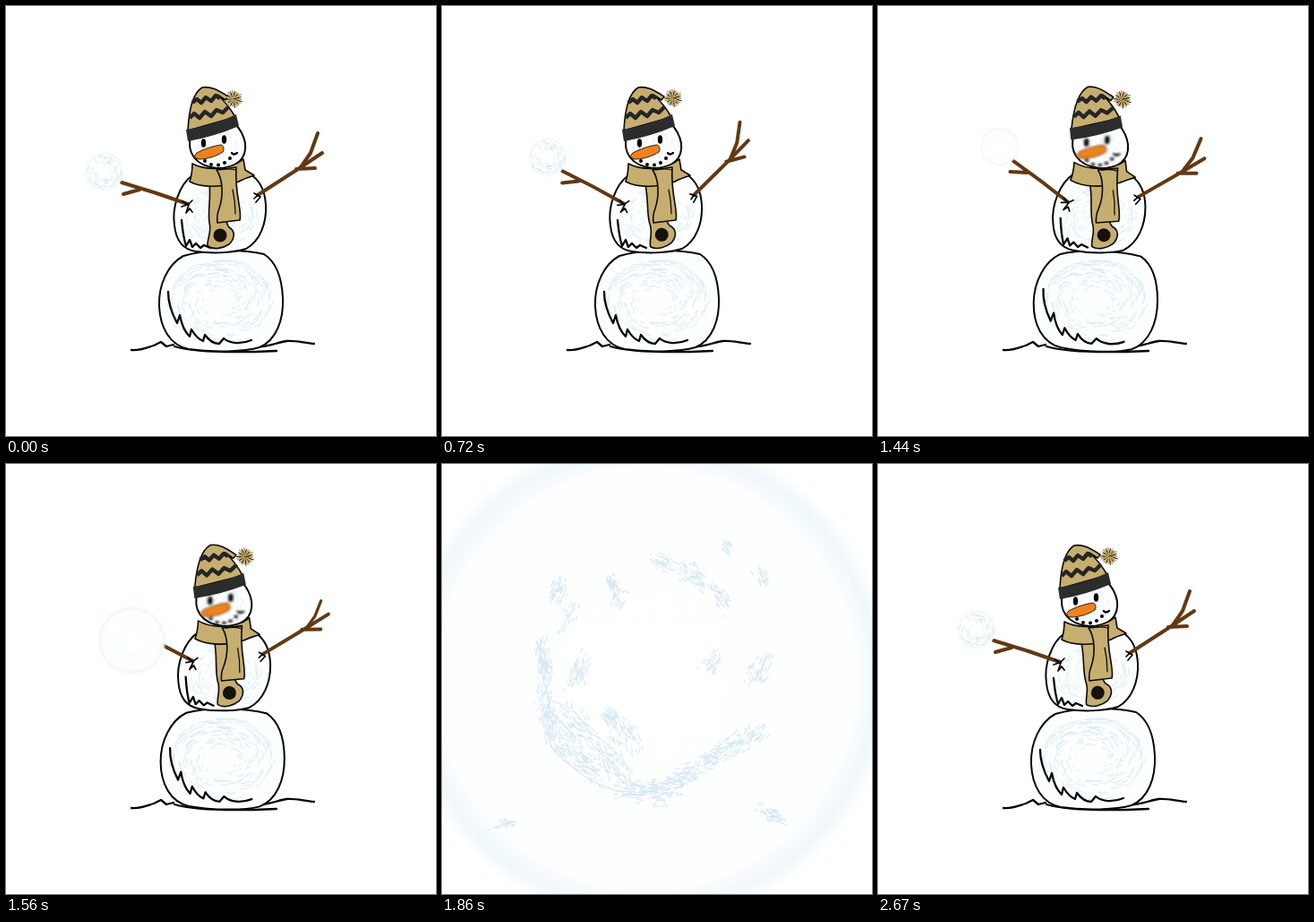
These frames come from a looping animation (480x480 px, 2.85 s). An HTML page:

```html
<!DOCTYPE html>
<html lang="en">
<head>
<meta charset="utf-8">
<title>Snowman throws a snowball</title>
<style>
  html, body { margin: 0; width: 100%; height: 100%; overflow: hidden; background: #fff; }
  svg { display: block; width: 100vw; height: 100vh; }
  .ink { fill: none; stroke: #050505; stroke-width: 2.3; stroke-linecap: round; stroke-linejoin: round; }
  .snow { fill: #fdfeff; stroke: #050505; stroke-width: 2; stroke-linejoin: round; }
  .wool { fill: #c6ae70; stroke: #0b0906; stroke-width: 1.6; stroke-linejoin: round; }
  .wood { fill: none; stroke: #633812; stroke-width: 4; stroke-linecap: round; stroke-linejoin: round; }
  .tex { fill: none; stroke: #d5e9f4; stroke-linecap: round; }
  .stripe { fill: none; stroke: #252525; stroke-width: 4.4; stroke-linejoin: round; }
</style>
</head>
<body>
<svg viewBox="0 0 480 480">
  <defs>
    <radialGradient id="puff">
      <stop offset="0" stop-color="#fff"/>
      <stop offset=".84" stop-color="#fdfeff"/>
      <stop offset=".93" stop-color="#eff7fa" stop-opacity=".9"/>
      <stop offset="1" stop-color="#eff7fa" stop-opacity="0"/>
    </radialGradient>
    <filter id="smear" x="-20%" y="-20%" width="140%" height="140%"><feGaussianBlur stdDeviation="1.5 .8"/></filter>
  </defs>

  <path class="ink" d="M140 384C150 385 158 381 165 379L173 375L179 380L187 378M188 380C212 387 260 387 302 385M279 381C294 380 302 376 313 374C323 373 332 376 344 377"/>

  <g id="man">
    <path class="snow" d="M198 279C181 288 170 311 171 335C172 359 183 379 204 383C231 387 266 386 283 381C302 373 310 350 309 326C308 303 302 286 288 277C262 271 222 272 198 279Z"/>
    <path class="tex" id="low"/>
    <path class="ink" d="M181 319C181 331 185 343 191 354L194 345C196 356 200 364 205 369L207 361C211 368 215 372 220 374L222 367C227 374 232 377 238 377L243 371C250 377 262 378 274 373"/>

    <path class="snow" d="M208 189C193 200 185 225 188 245C190 263 198 272 212 274C233 277 255 275 268 271C284 262 291 242 290 222C289 206 284 195 273 188Z"/>
    <path class="tex" id="mid"/>
    <path class="ink" d="M196 239C197 250 198 258 201 268L205 261L208 269L212 265L217 270L221 267L228 270"/>

    <path class="snow" d="M206 146C202 162 210 179 236 181C258 181 269 170 267 153C265 143 259 135 256 132Z"/>
    <path class="tex" id="top"/>
    <g id="face">
      <ellipse cx="220.500" cy="153" rx="2.700" ry="4.800"/>
      <ellipse cx="243.500" cy="149" rx="2.700" ry="4.800"/>
      <path d="M240 155C232 156 220 160 213 164C209 167 211 171 216 171C225 171 236 167 242 163C244 160 243 156 240 155Z" fill="#f0821e" stroke="#321804"/>
      <path class="ink" d="M252 164Q254 167 258 164"/>
      <g id="coal"></g>
    </g>

    <g id="tail">
      <path class="wool" d="M227 198C229 215 225 228 227 242C230 252 224 261 225 268C232 273 243 270 249 266C256 259 256 251 249 247C243 240 246 220 245 200Z"/>
      <circle cx="239" cy="256" r="7.500" fill="#15120d"/>
    </g>
    <path class="wool" d="M208 176C224 184 249 184 265 171L267 183L277 189C270 192 265 193 260 196C243 202 220 204 205 196Q208 187 208 176Z"/>
    <path class="wool" d="M235 183C242 193 243 211 238 226Q235 233 236 242L261 239C264 228 255 211 257 180Z"/>
    <path class="ink" d="M256 183Q249 181 239 183M253 205Q256 218 256 232" style="stroke-width:1.200"/>

    <path class="wool" d="M203 139C204 119 207 98 219 91C229 89 238 95 248 101L245 105L236 99C245 107 252 117 256 124Z"/>
    <path class="stripe" d="M208 108L213 104L218 108L223 102L229 106L234 100L239 103"/>
    <path class="stripe" d="M205 125L210 120L216 125L222 118L229 123L235 116L242 119L249 112"/>
    <path d="M201 138Q230 134 257 121L260 134Q232 146 203 151Z" fill="#2c2c2c"/>
    <g id="pom"></g>

    <g id="armL">
      <path class="wood" d="M203 221Q167 208 129 197M149 205L131 210"/>
      <path class="ink" d="M197 218L203 222L208 217M202 222L196 224M204 222L201 231L205 226L208 230" style="stroke-width:1.700"/>
    </g>
    <g id="armR">
      <path class="wood" d="M281 211L326 182L353 164M324 182L345 181"/>
      <path class="wood" id="twig" d="M329 180L340 164L348 142"/>
      <path class="ink" d="M277 209L284 213L279 219M281 211L277 215" style="stroke-width:1.700"/>
    </g>
  </g>

  <g id="hand"><circle r="22" fill="url(#puff)"/><path class="tex" id="handTex"/></g>
  <g id="shot">
    <circle id="disc" fill="url(#puff)"/>
    <path class="tex" id="splat" stroke-width="1.300"/>
  </g>
</svg>

<script>
const LOOP = 2850, STEP = 30;
const $ = id => document.getElementById(id);
const set = (id, k, v) => $(id).setAttribute(k, v);
const clamp = v => Math.max(0, Math.min(1, v));
const ease = v => v * v * (3 - 2 * v);
const f = v => v.toFixed(1);

let seed = 7;
const rnd = () => (seed = seed * 16807 % 2147483647) / 2147483647;
const spread = () => rnd() + rnd() - 1;

// Short brush arcs circling inside an ellipse
function scribble(id, cx, cy, rx, ry, n, w) {
  let d = '';
  for (let i = 0; i < n; i++) {
    const a = rnd() * 6.28, q = Math.sqrt(.08 + rnd() * .85), s = .1 + rnd() * .25;
    const at = (b, k) => f(cx + rx * k * Math.cos(b)) + ' ' + f(cy + ry * k * Math.sin(b));
    d += `M${at(a, q)}Q${at(a + s / 2, q * 1.04)} ${at(a + s, q * (.92 + rnd() * .1))}`;
  }
  set(id, 'd', d);
  set(id, 'stroke-width', w);
}

// Flecks scattered along a slanted streak
function streak(x, y, len, wide, deg, n) {
  const a = deg * Math.PI / 180, c = Math.cos(a), s = Math.sin(a);
  let d = '';
  for (let i = 0; i < n; i++) {
    const u = spread() * len / 2, v = spread() * wide / 2, l = 2 + rnd() * 6, b = a + spread() * .5;
    d += `M${f(x + u * c - v * s)} ${f(y + u * s + v * c)}l${f(l * Math.cos(b))} ${f(l * Math.sin(b))}`;
  }
  return d;
}

scribble('low', 240, 329, 62, 48, 190, .8);
scribble('mid', 239, 235, 45, 34, 100, .8);
scribble('top', 238, 159, 26, 19, 35, .7);
scribble('handTex', 0, 0, 20, 20, 75, .9);

const patches = [
  [125, 113, 42, 30, 112, 55], [137, 152, 62, 24, 110, 26], [196, 104, 24, 18, 70, 40],
  [207, 126, 34, 32, 115, 28], [265, 77, 40, 24, 25, 45], [308, 96, 62, 34, 40, 65],
  [346, 123, 60, 24, 55, 45], [354, 54, 28, 20, 65, 22], [407, 98, 34, 24, 65, 26],
  [152, 226, 66, 30, 112, 60], [337, 217, 38, 26, 128, 34], [402, 228, 56, 34, 118, 60],
  [195, 292, 36, 24, 50, 65], [216, 320, 62, 46, 60, 60], [45, 442, 46, 18, -8, 30],
  [416, 428, 56, 22, 22, 50], [103, 220, 90, 26, 85, 120], [106, 285, 100, 30, 80, 120],
  [137, 302, 76, 60, 50, 100], [150, 350, 110, 36, 42, 130], [190, 350, 120, 30, 50, 90]
];
let marks = patches.map(p => streak(...p)).join('');
// Lower crescent, thinning towards the right
for (let i = 0; i < 11; i++) {
  const k = i / 10;
  marks += streak(218 + 176 * k, 396 - 8 * Math.sin(k * 3) - 74 * k * k + 8 * Math.sin(k * 6), 46, 34, 8 - 50 * k, 52 - 22 * k);
}
marks += 'M98 184Q96 238 111 272Q101 300 112 334M108 270Q150 278 165 315Q196 328 226 372M112 334Q158 386 214 398M262 406l-8 11h20l-8 -11zM274 379l22 6l-8 -9z';
set('splat', 'd', marks);

$('coal').innerHTML = [[222, 173], [229, 177], [237, 177.500], [244, 175], [250, 170]]
  .map(([x, y]) => `<circle cx="${x}" cy="${y}" r="2"/>`).join('');

let fluff = '<circle cx="254" cy="104" r="7" fill="#c6ae70"/>';
for (let i = 0; i < 22; i++) {
  const a = i / 22 * 6.283, r = 8 + rnd() * 2.5;
  fluff += `<path d="M254 104l${f(r * Math.cos(a))} ${f(r * Math.sin(a))}" stroke="${i % 2 ? '#15110a' : '#c6ae70'}" stroke-width="${i % 2 ? 1 : 2}"/>`;
}
$('pom').innerHTML = fluff;

function track(t, keys) {
  if (t <= keys[0][0]) return keys[0][1];
  for (let i = 1; i < keys.length; i++) {
    const [t1, v1] = keys[i], [t0, v0] = keys[i - 1];
    if (t <= t1) return v0 + (v1 - v0) * ease((t - t0) / (t1 - t0));
  }
  return keys[keys.length - 1][1];
}

function turn([x, y], deg, [cx, cy]) {
  const a = deg * Math.PI / 180, c = Math.cos(a), s = Math.sin(a);
  return [cx + (x - cx) * c - (y - cy) * s, cy + (x - cx) * s + (y - cy) * c];
}

const FOOT = [240, 385], SHOULDER = [205, 222];
const WAVE = [[210, 0], [750, 1], [780, .97], [990, 0]];
const LEAN = [[1350, 0], [1440, 3], [1500, 3.300], [1680, -2.500], [1890, 0]];
const THROW = [[1350, 0], [1440, 16], [1500, 18], [1680, -25], [1890, 0]];

function draw(t) {
  const wave = track(t, WAVE), lean = track(t, LEAN);
  const armL = wave * 10 + track(t, THROW);
  const sway = t < 1170 ? wave : clamp((t - 1170) / 60);
  const fold = track(t, [[1500, 1], [1680, .25], [1890, 1]]);

  set('man', 'transform', `rotate(${lean} ${FOOT})`);
  set('armL', 'transform', `rotate(${armL} ${SHOULDER})`);
  set('armR', 'transform', `rotate(${-12 * wave} 281 210)`);
  set('twig', 'transform', `translate(329 180) scale(${fold}) translate(-329 -180)`);
  set('tail', 'transform', `rotate(${-6.500 * sway} 236 200)`);
  set('pom', 'transform', `translate(${4 * sway} ${-sway})`);
  if (t > 1380 && t < 1890) set('face', 'filter', 'url(#smear)');
  else $('face').removeAttribute('filter');

  const held = t < 1440 || t >= 1890;
  const [hx, hy] = turn(turn([110, 185], armL, SHOULDER), lean, FOOT);
  set('hand', 'visibility', held ? 'visible' : 'hidden');
  set('hand', 'transform', `translate(${hx} ${hy})`);

  const flying = t >= 1440 && t < 2670;
  set('shot', 'visibility', flying ? 'visible' : 'hidden');
  if (!flying) return;
  const p = clamp((t - 1440) / 450);
  const r = 22 * Math.exp(2.750 * p ** 1.200);
  const x = 136 + 109 * p ** 2.400, y = 157 + 83 * (1 - (1 - p) ** 2.100);
  const drop = 600 * clamp((t - 2370) / 300) ** 2.500;
  set('shot', 'transform', `translate(${x} ${y + drop})`);
  set('disc', 'r', p < 1 ? r : r * 1.150);
  set('splat', 'transform', `scale(${r / 344}) translate(-245 -240)`);
  set('splat', 'opacity', .15 + .85 * clamp((p - .55) / .4));
}

const start = performance.now();
function tick() {
  const t = (performance.now() - start) % LOOP;
  draw(Math.floor(t / STEP) * STEP);
  requestAnimationFrame(tick);
}
tick();
</script>
</body>
</html>
```
